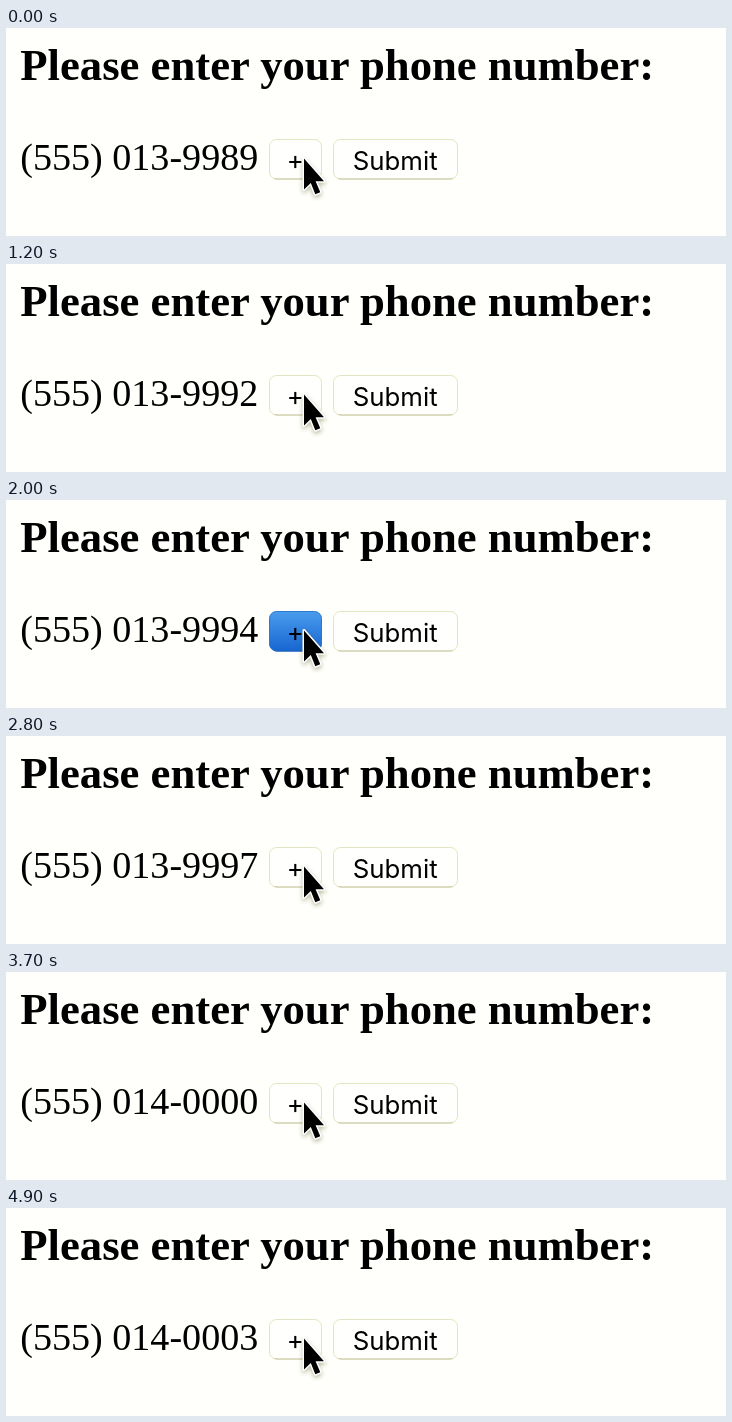
Recreate the animation shown at these times as an HTML page. Size 720 by 208 pixels, loop 5000 ms.

```html
<!DOCTYPE html>
<html lang="en">
<head>
<meta charset="utf-8">
<title>Phone number form</title>
<style>
  html, body { margin: 0; width: 100%; height: 100%; overflow: hidden; background: #fffffb; }
  svg { display: block; width: 720px; height: 208px; }
  .serif { font-family: "Liberation Serif", "Times New Roman", serif; }
  .label { font: 25.8px Inter, Roboto, sans-serif; text-anchor: middle; }
  .button { fill: #fffffd; stroke: #e4e4c4; }
  .edge { fill: none; stroke: #c6c6a0; }
  .pressed .button { fill: url(#blue); stroke: #2b78cf; }
  .pressed .edge { stroke: #1557b4; }
  .cursor { stroke: #fff; stroke-width: 3; stroke-linejoin: round; paint-order: stroke;
    filter: drop-shadow(0 2px 2px rgba(60, 60, 0, .35)); }
</style>
</head>
<body>
<svg viewBox="0 0 720 208">
  <defs>
    <linearGradient id="blue" x1="0" y1="0" x2="0" y2="1">
      <stop offset="0" stop-color="#4a9cec"/>
      <stop offset="1" stop-color="#1766d2"/>
    </linearGradient>
  </defs>
  <text class="serif" x="14.3" y="52" font-size="44.7" font-weight="bold">Please enter your phone number:</text>
  <text class="serif" id="phone" x="14.3" y="142" font-size="38.1"></text>
  <g id="plus">
    <rect class="button" x="263.5" y="111.5" width="52" height="39.5" rx="7"/>
    <path class="edge" d="M268.5 150.5Q269.5 151 271.5 151H307.5Q309.5 151 310.5 150.5"/>
    <text class="label" x="289.3" y="141.2" font-weight="300">+</text>
  </g>
  <g>
    <rect class="button" x="327.5" y="111.5" width="124" height="39.5" rx="7"/>
    <path class="edge" d="M332.5 150.5Q333.5 151 335.5 151H443.5Q445.5 151 446.5 150.5"/>
    <text class="label" x="389.2" y="141.6">Submit</text>
  </g>
  <path class="cursor" d="M298 130.5V161.5L304.8 155L309.3 166.3L314.3 164.2L309.6 153.2H318Z"/>
</svg>
<script>
  const LOOP = 5000, STEP = 100, START = 139989;
  // moments at which the mouse button is released
  const clicks = [400, 700, 1100, 1400, 1700, 2100, 2400, 2700, 3000, 3300, 3600, 3900, 4200, 4600];
  const phone = document.getElementById('phone');
  const plus = document.getElementById('plus');

  function format(n) {
    const digits = String(n).padStart(7, '0');
    return `(555) ${digits.slice(0, 3)}-${digits.slice(3)}`;
  }

  function draw(time) {
    const t = Math.floor(time % LOOP / STEP) * STEP;
    const count = clicks.filter(c => c <= t).length;
    const text = format(START + count);
    if (phone.textContent !== text) phone.textContent = text;
    plus.classList.toggle('pressed', clicks.includes(t + STEP));
  }

  const begin = performance.now();
  function tick() {
    draw(performance.now() - begin);
    requestAnimationFrame(tick);
  }
  tick();
</script>
</body>
</html>
```
